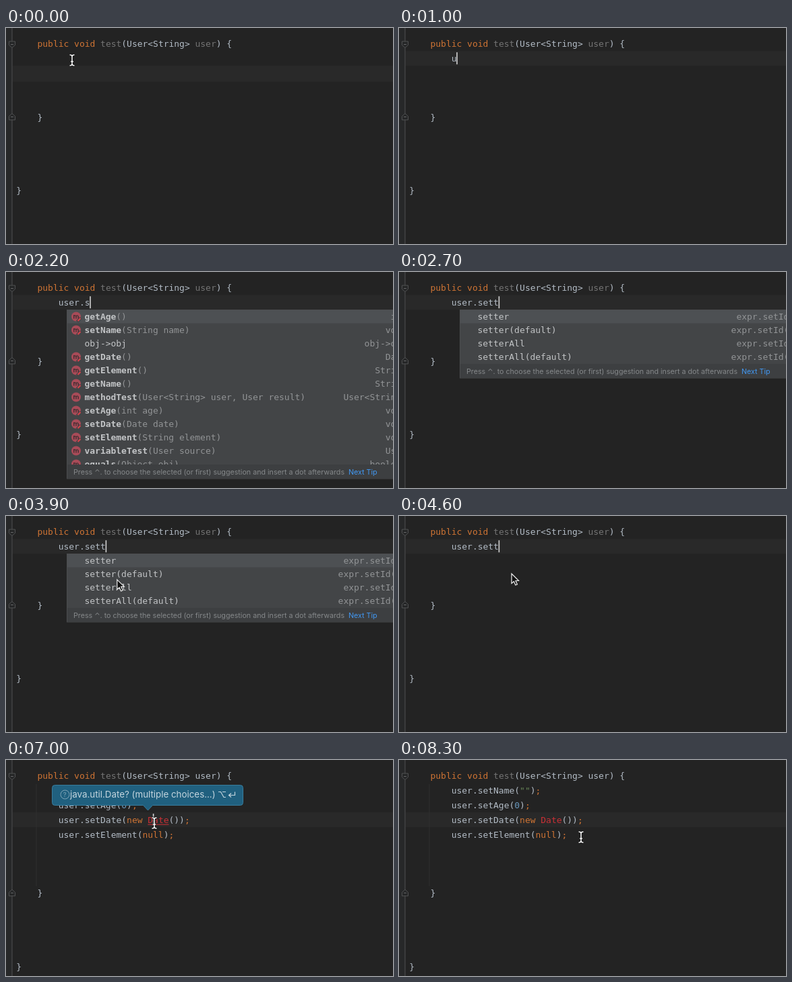
An HTML page for the animation above (8400 ms loop, 574 by 322 pixels).

```html
<!DOCTYPE html>
<html lang="en">
<head>
<meta charset="utf-8">
<title>Editor completion</title>
<style>
  html, body { margin: 0; width: 100%; height: 100%; overflow: hidden; background: #232323; }
  svg { display: block; }
  text { white-space: pre; font: 12.96px "DejaVu Sans Mono", "Noto Sans Mono", monospace; }
  .name { font-weight: 700; }
  .ui { font-family: Inter, "Open Sans", sans-serif; }
</style>
</head>
<body>
<svg id="stage" width="574" height="322" viewBox="0 0 574 322"></svg>
<script>
const LOOP = 8400, STEP = 100;
const CHAR = 7.8, LINE = 21.9, LEFT = 46.5, INDENT = LEFT + 4 * CHAR;
const KEY = '#cf7434', DIM = '#747474', PLAIN = '#b3bcc6', RED = '#cb3036', NUM = '#6897bb', STR = '#6a8759';
const ITEM = '#c3c5c7', DETAIL = '#929496';

const stage = document.getElementById('stage');
const escapeText = s => s.replace(/&/g, '&amp;').replace(/</g, '&lt;');
const rect = (x, y, w, h, fill, more = '') =>
  `<rect x="${x}" y="${y}" width="${w}" height="${h}" fill="${fill}" ${more}/>`;
const path = (d, more) => `<path d="${d}" ${more}/>`;
const text = (x, y, s, fill, more = '') =>
  `<text x="${x}" y="${y}" fill="${fill}" ${more}>${escapeText(s)}</text>`;
const label = (x, y, size, s, fill) => text(x, y, s, fill, `class="ui" style="font-size:${size}px"`);
const rowTop = row => 12.3 + row * LINE;
const baseline = row => 28 + row * LINE;

// Parts are [text, colour] pairs that follow one another on a line.
function code(x, row, ...parts) {
  const spans = parts.map(([s, fill]) => `<tspan fill="${fill}">${escapeText(s)}</tspan>`);
  return `<text x="${x}" y="${baseline(row)}">${spans.join('')}</text>`;
}

const ALL = [
  ['getAge', '()', 'int'], ['setName', '(String name)', 'void'], ['obj->obj', null, 'obj->obj'],
  ['getDate', '()', 'Date'], ['getElement', '()', 'String'], ['getName', '()', 'String'],
  ['methodTest', '(User<String> user, User result)', 'User<String>'], ['setAge', '(int age)', 'void'],
  ['setDate', '(Date date)', 'void'], ['setElement', '(String element)', 'void'],
  ['variableTest', '(User source)', 'User'], ['equals', '(Object obj)', 'boolean']
];
const TEMPLATES = [
  ['setter', null, 'expr.setId()'], ['setter(default)', null, 'expr.setId(0)'],
  ['setterAll', null, 'expr.setId()'], ['setterAll(default)', null, 'expr.setId(0)']
];
const MATCHES = ALL.filter(item => item[0].startsWith('set')).concat(TEMPLATES);

function methodIcon(y, marked) {
  const disc = `<circle cx="104" cy="${y}" r="7" fill="#a94b58"/>` +
    path(`M100.8 ${y + 3}v-5.5m0 2q1.6-2.5 3.2 0v3.5m0-3.5q1.6-2.5 3.2 0v3.5`,
      'fill="none" stroke="#33292c" stroke-width="1.2"');
  return marked ? disc + path(`M105.5 ${y + 7.5}l5.5-5.5`, 'stroke="#434547" stroke-width="4.5"') +
    path(`M106.5 ${y + 6.5}l4-4`, 'stroke="#d8404a" stroke-width="2.2"') : disc;
}

function popup(items, selected) {
  const footer = Math.min(57 + items.length * 20, 287);
  let out = rect(90.5, 56.5, 500, footer - 35.5, '#434547', 'stroke="#4b4d4f"') +
    rect(91, 57 + selected * 20, 483, 19.5, '#4d5053');
  items.forEach(([name, args, type], i) => {
    const y = 71 + i * 20;
    if (args) {
      out += methodIcon(y - 4.5, !name.endsWith('Test')) +
        text(116.5 + name.length * CHAR, y, args, DETAIL);
    }
    out += text(116.5, y, name, ITEM, args ? 'class="name"' : '') +
      text(594, y, type, DETAIL, 'text-anchor="end"');
  });
  return out + rect(91, footer, 483, 21, '#3d3f41') +
    label(100, footer + 14.5, 10.7,
      'Press ⌃. to choose the selected (or first) suggestion and insert a dot afterwards', '#85888a') +
    label(508, footer + 14.5, 10.7, 'Next Tip', '#4298f2');
}

function importHint() {
  const ink = '#c4d5de';
  return path('M72.5 37.5H347.5q4 0 4 4V63.5q0 4-4 4H217.5L210.5 75L203.5 67.5H72.5q-4 0-4-4V41.5q0-4 4-4Z',
    'fill="#20607f" stroke="#397d9d"') +
    '<circle cx="87.5" cy="51.5" r="6.5" fill="none" stroke="#7fa5b7"/>' +
    label(84.8, 55, 9.5, '?', '#7fa5b7') +
    label(95, 56, 13.35, 'java.util.Date? (multiple choices...)', ink) +
    path('M315 47.5h3.5l4.5 8h3m-5-8h5M339.5 47.5v5h-9m3.5-3l-3.5 3l3.5 3', `fill="none" stroke="${ink}" stroke-width="1.2"`);
}

function foldMark(y, flip) {
  return path(`M4.5 ${y - 4.5 * flip}h9v${5.5 * flip}l-4.5 ${4 * flip}l-4.5 ${-4 * flip}Z`,
    'fill="#252627" stroke="#515253"') + path(`M7 ${y}h4`, 'stroke="#666768"');
}

function beam(x, y) {
  const d = `M${x - 3.5} ${y - 8}q3.5 0 3.5 2.5v11q0 2.5-3.5 2.5M${x + 3.5} ${y - 8}q-3.5 0-3.5 2.5v11q0 2.5 3.5 2.5M${x - 2} ${y + 2}h4`;
  return path(d, 'fill="none" stroke="#161616" stroke-width="3.4"') +
    path(d, 'fill="none" stroke="#f2f2f2" stroke-width="1.6"');
}

const arrow = (x, y) =>
  path(`M${x} ${y}v14.5l3.4-3l2.4 5.5l2.6-1.1l-2.4-5.4h4.5Z`, 'fill="#111" stroke="#eee" stroke-width="1.2"');

// Eased position along [time, x, y] stops.
function along(stops, t) {
  if (t <= stops[0][0]) return stops[0].slice(1);
  for (let i = 1; i < stops.length; i++) {
    const [t0, x0, y0] = stops[i - 1], [t1, x1, y1] = stops[i];
    if (t > t1) continue;
    const p = (t - t0) / (t1 - t0), k = p * p * (3 - 2 * p);
    return [x0 + (x1 - x0) * k, y0 + (y1 - y0) * k];
  }
  return stops[stops.length - 1].slice(1);
}

function pointer(t) {
  if (t < 1000) return beam(...along([[0, 98, 48], [700, 150, 46]], t));
  if (t < 3200) return '';
  if (t < 5300) return arrow(...along([[3200, 150, 48], [3500, 158, 72], [3800, 164, 98], [4100, 167, 86]], t));
  return beam(...along([[5200, 172, 94], [5500, 220, 94], [8000, 220, 94], [8300, 270, 115]], t));
}

function typed(t) {
  if (t >= 2200) return 'user.sett'.slice(0, t >= 2600 ? 9 : 6 + Math.min(2, (t - 2200) / STEP));
  return 'user.'.slice(0, Math.max(0, Math.min(5, (t - 900) / STEP)));
}

function completion(t) {
  if (t < 1600 || t >= 4500) return '';
  if (t < 2400) return popup(ALL, 0);
  if (t < 2700) return popup(MATCHES, 0);
  return popup(TEMPLATES, t >= 4400 ? 1 : 0);
}

function caret(t, expanded) {
  if (t < 900 || t >= 8200) return '';
  let row = 1, x = INDENT + typed(t).length * CHAR;
  if (expanded) [row, x] = t < 6600 ? [4, INDENT + 22 * CHAR] : [3, INDENT + 18 * CHAR];
  const blinkOff = t >= 6600 && t % 1000 >= 500;
  return blinkOff ? '' : rect(x - .3, rowTop(row) + 2, 1.6, 18, '#d2d2d2');
}

function draw(t) {
  const expanded = t >= 4800, hint = t >= 5600 && t < 7500;
  const activeRow = t < 900 ? 2 : !expanded ? 1 : t < 6600 ? 4 : 3;
  const close = expanded ? 8 : 5, end = close + 5;
  let out = rect(0, 0, 574, 322, '#232323') + rect(0, 0, 9, 322, '#272829') +
    rect(10, rowTop(activeRow), 564, activeRow === 2 ? 24 : 22, '#292929') +
    rect(8.5, 0, 1, 322, '#505152') + foldMark(24.5, 1) + foldMark(baseline(close) - 5, -1);

  out += code(LEFT, 0, ['public void ', KEY], ['test', DIM], ['(User<String> ', PLAIN],
    ['user', expanded ? PLAIN : DIM], [') {', PLAIN]);

  if (expanded) {
    const call = (row, name, ...args) =>
      code(INDENT, row, [`user.${name}(`, PLAIN], ...args, [')', PLAIN], [';', KEY]);
    out += rect(44.5, 36, 1, 152, '#303030') +
      call(1, 'setName', ['""', STR]) +
      call(2, 'setAge', ['0', NUM]) +
      call(3, 'setDate', ['new ', KEY], ['Date', RED], ['()', PLAIN]) +
      call(4, 'setElement', ['null', KEY]);
    if (hint) out += rect(INDENT + 17 * CHAR, baseline(3) + 2, 4 * CHAR, 1, RED);
  } else {
    out += code(INDENT, 1, [typed(t), PLAIN]);
  }
  out += code(LEFT, close, ['}', PLAIN]) + code(LEFT - 4 * CHAR, end, ['}', PLAIN]);
  stage.innerHTML = out + caret(t, expanded) + completion(t) + (hint ? importHint() : '') + pointer(t);
}

const start = performance.now();
let shown = -1;
function tick(now) {
  const t = Math.floor((Math.max(0, now - start) % LOOP) / STEP) * STEP;
  if (t !== shown) draw(shown = t);
  requestAnimationFrame(tick);
}
draw(0);
requestAnimationFrame(tick);
</script>
</body>
</html>
```
